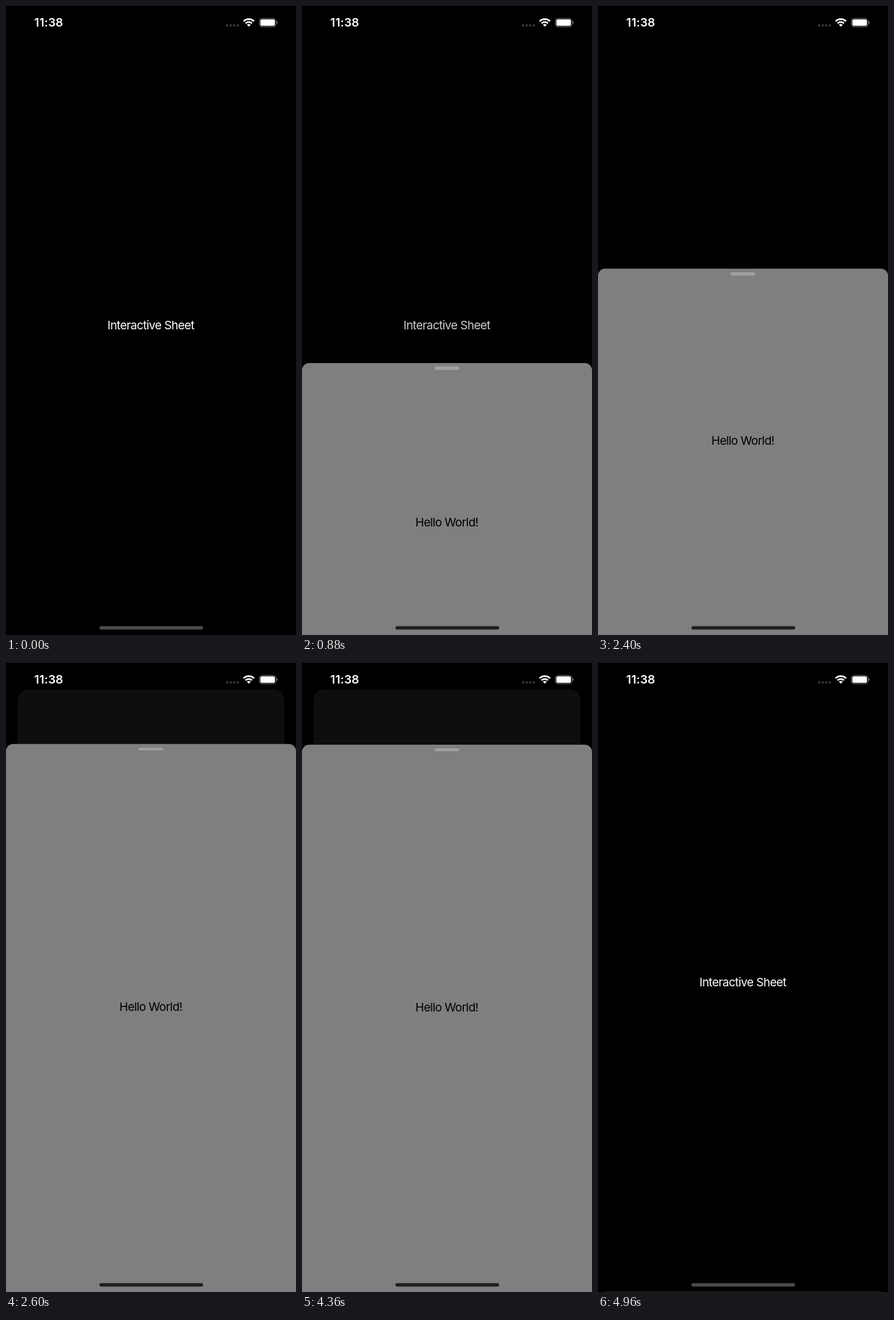
Recreate the animation shown at these times as an HTML page. Size 509x1101 px, loop 5040 ms.

```html
<!DOCTYPE html>
<html lang="en">
<head>
<meta charset="utf-8">
<title>Interactive Sheet</title>
<style>
  html, body { margin: 0; width: 100%; height: 100%; overflow: hidden; background: #000; }
  svg { display: block; width: 100%; height: 100%; }
  text { font: 400 20.6px Inter, "Open Sans", sans-serif; letter-spacing: -.7px; }
  #clock { font-size: 20.6px; font-weight: 600; letter-spacing: .1px; }
</style>
</head>
<body>
<svg viewBox="0 0 509 1101">
  <rect width="509" height="1101"/>
  <g id="card">
    <rect id="cardBg" width="509" height="1101"/>
    <text id="title" x="254.2" y="566" text-anchor="middle" fill="#fff">Interactive Sheet</text>
  </g>
  <g id="sheet">
    <rect id="panel" width="509" height="1130" rx="12.5" fill="#807e80"/>
    <rect id="grabber" x="233" y="6" width="43" rx="2.8" fill="#a19fa2"/>
    <text id="hello" x="254.2" text-anchor="middle" fill="#000">Hello World!</text>
  </g>
  <rect id="edge" x="11" y="1100" width="487" height="1" fill="#222"/>
  <g id="status" fill="#fff">
    <text id="clock" x="49.6" y="36.4">11:38</text>
    <g fill="#333">
      <circle cx="388" cy="34" r="2.3"/><circle cx="394.3" cy="34" r="2.3"/>
      <circle cx="400.6" cy="34" r="2.3"/><circle cx="406.9" cy="34" r="2.3"/>
    </g>
    <g fill="none" stroke="#fff" stroke-width="3">
      <path d="M417 26.8a13 13 0 0 1 18.4 0"/>
      <path d="M420.5 30.3a8.1 8.1 0 0 1 11.4 0"/>
    </g>
    <path d="M426.2 36.2l-3.4-3.4a4.8 4.8 0 0 1 6.8 0z"/>
    <rect x="444.7" y="21.5" width="29.2" height="15" rx="4.6" fill="none" stroke="#6c6c6c" stroke-width="1.2"/>
    <rect x="446.4" y="23.3" width="25.6" height="11.4" rx="2.8"/>
    <path d="M475.2 26.6q1.6.7 1.6 2.4t-1.6 2.4z" fill="#888"/>
  </g>
  <rect id="home" x="164" y="1085.6" width="182" height="5.8" rx="2.9"/>
</svg>
<script>
const LOOP = 5040, STEP = 40;
const HIDDEN = 1101, HALF = 504, FULL = 68;
const $ = id => document.getElementById(id);
const set = (id, attrs) => {
  for (const name in attrs) $(id).setAttribute(name, attrs[name]);
};

// Critically damped spring, ms in, position out
function spring(ms, from, to, w, v = 0) {
  const t = ms / 1000, x = from - to;
  return to + (x + (v + w * x) * t) * Math.exp(-w * t);
}

function sheetTop(t) {
  if (t < 720 || t >= 4760) return HIDDEN;
  if (t < 2360) return spring(t - 720, HIDDEN, HALF, 18.6);
  if (t < 4320) return spring(t - 2360, HALF, FULL, 13.4);
  if (t < 4360) return FULL + 75 * (t - 4320) / 40;
  return spring(t - 4360, FULL + 75, HIDDEN, 19, 1875);
}

function draw(t) {
  const top = sheetTop(t);
  const rise = Math.max(0, Math.min(1, (HALF - top) / (HALF - FULL)));
  const shown = Math.min(1, (HIDDEN - top) / (HIDDEN - HALF));
  const scale = 1 - rise * 49 / 509;
  const glow = rise ** 1.5;

  set("card", { transform: `translate(${24.5 * rise} ${56 * rise}) scale(${scale})` });
  set("cardBg", {
    rx: (60 - 50 * rise) / scale,
    fill: `rgb(${18 * glow},${17 * glow},${21 * glow})`
  });
  set("title", { opacity: 1 - 0.25 * shown });

  set("sheet", {
    transform: `translate(0 ${top})`,
    visibility: top < HIDDEN ? "visible" : "hidden"
  });
  set("grabber", { y: 6 + 0.6 * rise, height: 6 - 1.4 * rise });
  set("hello", { y: (1062 - Math.min(top, HALF)) / 2 + 7.2 });

  set("home", { fill: top < 1085 ? "#1f1e20" : "#4b4b4b" });
  set("edge", { visibility: t >= 4960 ? "visible" : "hidden" });
}

let start;
function tick(now) {
  start ??= now;
  const t = (now - start) % LOOP;
  draw(Math.floor(t / STEP) * STEP);
  requestAnimationFrame(tick);
}
draw(0);
requestAnimationFrame(tick);
</script>
</body>
</html>
```
